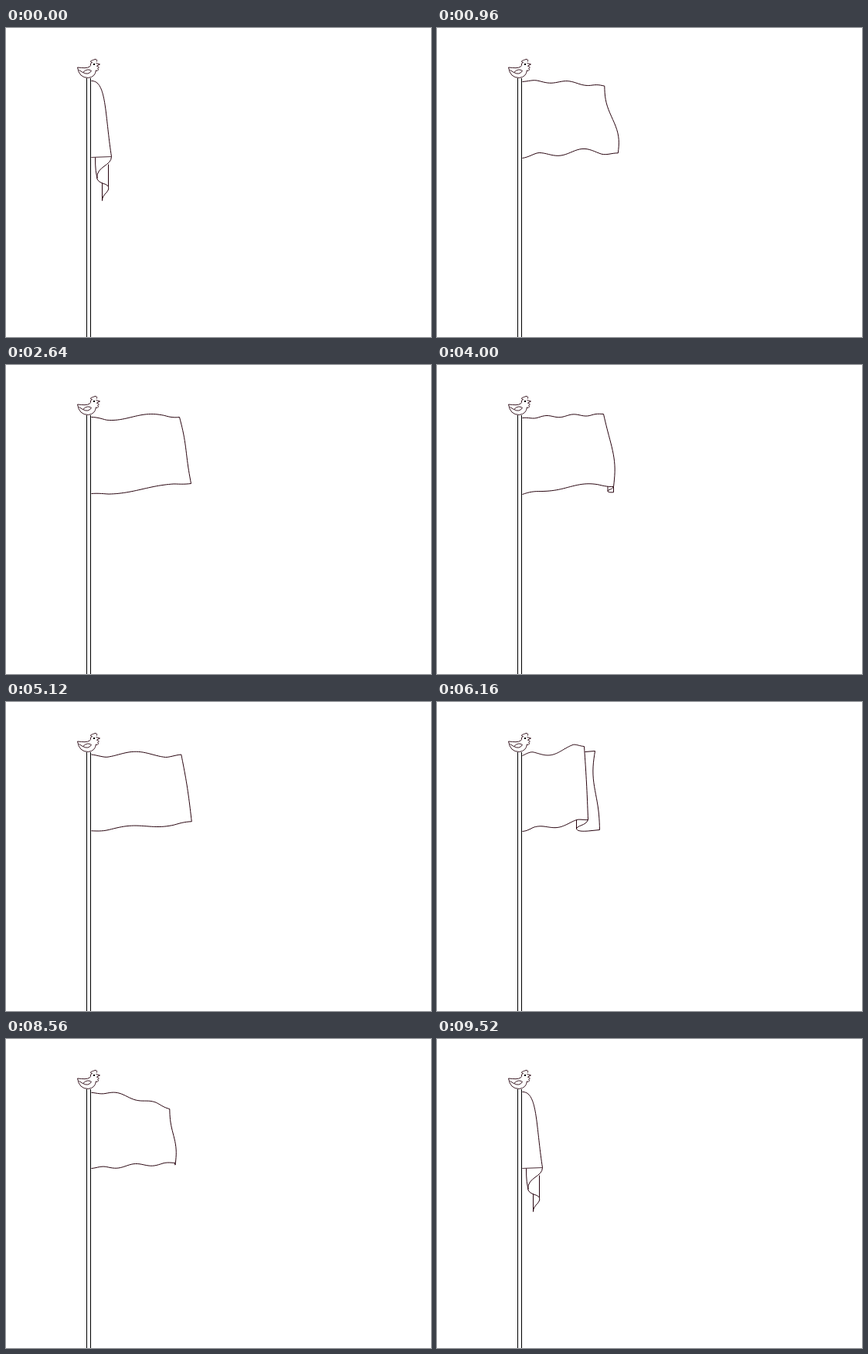
An HTML page with a canvas that plays this animation: 550 by 400 pixels, repeating every 9600 ms.

```html
<!DOCTYPE html>
<html lang="en">
<head>
<meta charset="utf-8">
<title>Flag</title>
<style>
  html, body { margin: 0; width: 100%; height: 100%; overflow: hidden; background: #fff; }
  canvas { display: block; width: 550px; height: 400px; }
</style>
</head>
<body>
<canvas id="stage" width="550" height="400"></canvas>
<script>
const ctx = document.getElementById('stage').getContext('2d');
const LOOP = 9600, STEP = 80, POLE = 110, INK = '#28040f';
const { PI, sin, min } = Math;

const lerp = (a, b, u) => a + (b - a) * u;

function mix(a, b, u) {
  const out = {};
  for (const k in a) out[k] = a[k].map((v, i) => lerp(v, b[k][i], u));
  return out;
}

// tip, low: free corners. top, hem: [height at pole, wave size, waves, phase, sag].
// edge: [bow, sway]. fold: [roll, flap, droop].
const pose = (tip, low, top, hem, edge, fold = [0, 0, 0]) => ({ tip, low, top, hem, edge, fold });

const hang = pose([136, 166], [136, 166], [68, 0, 2, -0.6, 0], [167, 0, 2, -0.6, 0], [0, 0], [0, 0, 1]);
const wave = pose([233, 69], [242, 158], [69, 3, 2, -0.61, 0], [167, 2.5, 2.5, -0.05, 0], [1.8, -2]);
const taut = pose([224, 67], [239, 153], [67, 4, 1.1, 0, 0], [166, 2.6, 1, 0, 1], [1, 0.7]);
const curl = pose([215, 63], [228, 157], [68, 1.5, 3, -0.13, 0], [167, 2.7, 1.3, -0.2, -5], [5.2, -1.2], [0.5, 0, 0]);
const fold = pose([190, 57], [195, 152], [69, 4.7, 1.2, -0.3, 0], [167, 3, 1.5, -0.575, 0], [0.5, 0], [1, 1, 0]);
const gust = pose([223, 67], [242, 161], [69, 2, 2.3, -0.58, -0.5], [168, 4, 2, -0.61, -5], [2.1, -3.7]);
const droop = mix(gust, hang, 0.8);

const keys = [
  [0, hang], [1040, gust], [1840, wave], [2640, taut], [3440, fold], [4000, curl],
  [4640, wave], [5280, taut], [5760, curl], [6160, fold], [6640, curl], [7040, wave],
  [7680, gust], [8320, wave], [9200, droop], [9280, droop], [9520, hang], [LOOP, hang]
];

const sample = (n, f) => Array.from({ length: n + 1 }, (_, i) => f(i / n));

// Edge leaving the pole: a travelling wave that fades at both ends,
// bent over like a shoulder when the cloth hangs.
function waveEdge([y0, size, waves, phase, sag], [x1, y1], drift, bend) {
  return sample(40, s => {
    const calm = min(1, 6 * s, 6 * (1 - s));
    const near = 3 * s * (1 - s) ** 2 * bend, far = 3 * s * s * (1 - s) * bend;
    return [
      lerp(POLE, x1, s) + 11 * near,
      lerp(y0, y1, s) + sag * sin(PI * s) - 33 * near - 23 * far
        + size * calm * sin(2 * PI * (waves * s + phase - drift))
    ];
  });
}

const freeEdge = (a, b, [bow, sway]) => sample(20, s => [
  lerp(a[0], b[0], s) + bow * sin(PI * s) + sway * sin(2 * PI * s),
  lerp(a[1], b[1], s)
]);

const trace = pts => pts.forEach(([x, y]) => ctx.lineTo(x, y));

function stroke(pts) {
  ctx.beginPath();
  trace(pts);
  ctx.stroke();
}

const ROLL = new Path2D('M0 0C-3 8 -15 7 -15 12C-13 15 -7 15 0 14.5M-15 -1V12');
const DRAPE = new Path2D('M0 0C0 12 -19 12 -19 28C-16 36 -6 34 -4 39C-2 46 -12 48 -12 57V34M-4 10V39M-21 1Q-21 22 -18 28');

function strokeScaled(path, [x, y], size) {
  if (size < 0.02) return;
  ctx.save();
  ctx.translate(x, y);
  ctx.scale(size, size);
  ctx.lineWidth /= size;
  ctx.stroke(path);
  ctx.restore();
}

function drawFolds({ tip, low, fold: [roll, flap, bend] }) {
  const off = ([x, y], dx, dy, k) => [x + dx * k, y + dy * k];
  const corner = off(low, 15, 13, flap);
  if (flap > 0.02) {
    const brim = off(tip, 14, 6, flap);
    stroke([off(tip, 1, 7, flap), brim]);
    stroke(freeEdge(brim, corner, [-3 * flap, -2 * flap]));
  }
  if (roll > 0.02) stroke([off(low, 0, 14.5, roll), corner]);
  strokeScaled(ROLL, low, roll);
  strokeScaled(DRAPE, low, bend * bend);
}

function drawFlag(p, drift) {
  const bend = p.fold[2];
  const top = waveEdge(p.top, p.tip, drift, bend);
  const hem = waveEdge(p.hem, p.low, drift, 0);
  const side = freeEdge(p.tip, p.low, p.edge);
  ctx.strokeStyle = INK;
  ctx.lineWidth = 1;
  drawFolds(p);
  ctx.beginPath();
  [top, side, [...hem].reverse()].forEach(trace);
  ctx.fillStyle = '#fff';
  ctx.fill();
  [top, side, hem].forEach(stroke);
}

const BIRD = new Path2D(
  'M109 48Q107 52 97 51L92 50.5Q94 64 106 64Q115 63 116 54' +
  'M109 48Q108 45 111 44Q106 43 112 41Q118 38 117 43' +
  'M116 45L121 46.5L117 48.5M117 49Q122 50 118 52Q121 54 116 55' +
  'M99 57Q105 51 110 55Q106 61 99 57L94 54');

function drawPole() {
  ctx.strokeStyle = INK;
  ctx.lineWidth = 0.9;
  ctx.stroke(BIRD);
  ctx.fillStyle = '#000';
  ctx.fillRect(112.5, 45.5, 2, 2);
  for (const x of [103.5, 108.5]) ctx.fillRect(x, 64.5, 1, 336);
}

function draw() {
  const t = Math.floor(performance.now() % LOOP / STEP) * STEP;
  const n = keys.findIndex(k => k[0] > t);
  const [t0, from] = keys[n - 1], [t1, to] = keys[n];
  const u = (t - t0) / (t1 - t0);
  ctx.setTransform(1, 0, 0, 1, 0, 0);
  ctx.fillStyle = '#fff';
  ctx.fillRect(0, 0, 550, 400);
  ctx.translate(0.5, 0.5);
  drawFlag(mix(from, to, u), u);
  drawPole();
  requestAnimationFrame(draw);
}
draw();
</script>
</body>
</html>
```
